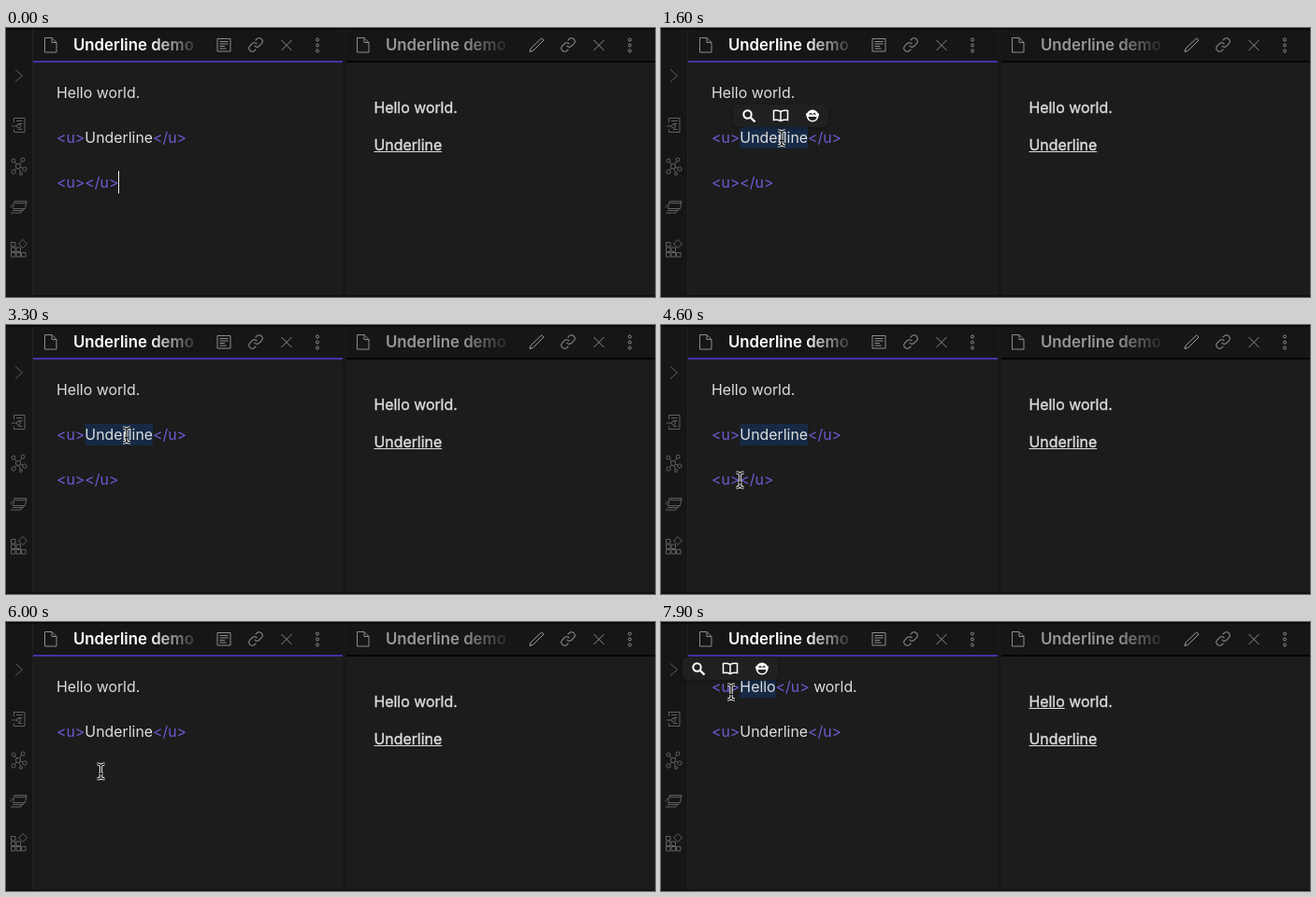
Animation of 694 by 288 pixels, one loop 8000 ms. Source, as an HTML page with a canvas:

```html
<!DOCTYPE html>
<html lang="en">
<head>
<meta charset="utf-8">
<title>Underline demo</title>
<style>
html, body { margin: 0; width: 100%; height: 100%; overflow: hidden; background: #1c1c1c; }
canvas { display: block; }
</style>
</head>
<body>
<canvas id="stage" width="694" height="288"></canvas>
<script>
const ctx = document.getElementById('stage').getContext('2d');
const LOOP = 8000, STEP = 100;
const TEXT = '#dcddde', TAG = '#6c5bd0', SELECTED = '#162a46';
const BODY_FONT = '15.87px Inter, sans-serif';
const TITLE_FONT = '600 16.8px Inter, sans-serif';
const REST = [129, 118];

// Pointer path: time, x, y
const path = [
  [500, 174, 228], [900, 88, 165], [1200, ...REST], [1900, ...REST],
  [2000, 174, 150], [2100, 76, 161], [2200, ...REST], [3700, ...REST],
  [4000, 150, 150], [4300, 91, 175], [4400, 91, 175], [4500, 84.5, 166],
  [5500, 84.5, 166], [6000, 101.5, 160], [6200, 136, 110], [6400, 108, 61],
  [6600, 75, 75], [LOOP, 75, 75]
];

const within = (t, from, to) => t >= from && t < to;
const ramp = (t, from, to) => Math.min(1, Math.max(0, (t - from) / (to - from)));

function rect(x, y, w, h, color) {
  ctx.fillStyle = color;
  ctx.fillRect(x, y, w, h);
}

function stroke(d, color, width = 1) {
  ctx.strokeStyle = color;
  ctx.lineWidth = width;
  ctx.stroke(new Path2D(d));
}

function fill(d, color) {
  ctx.fillStyle = color;
  ctx.fill(new Path2D(d));
}

const circle = (x, y, r) => `M${x - r} ${y}a${r} ${r} 0 1 0 ${2 * r} 0a${r} ${r} 0 1 0 ${-2 * r} 0z`;

function at(x, y, draw, scale = 1) {
  ctx.save();
  ctx.translate(x, y);
  ctx.scale(scale, scale);
  draw();
  ctx.restore();
}

// Draws text pieces in a row; tags are coloured, the selected piece gets a background.
function row(x, y, parts, selected) {
  ctx.font = BODY_FONT;
  for (const part of parts) {
    const w = ctx.measureText(part).width;
    if (part === selected) rect(x, y - 17, w, 23, SELECTED);
    ctx.fillStyle = part[0] === '<' ? TAG : TEXT;
    ctx.fillText(part, x, y);
    x += w;
  }
}

function preview(y, word, rest, underlined) {
  const x = 393.5;
  ctx.font = BODY_FONT;
  ctx.fillStyle = ctx.strokeStyle = TEXT;
  ctx.lineWidth = 0.35;
  ctx.fillText(word + rest, x, y);
  ctx.strokeText(word + rest, x, y);
  if (underlined) rect(x, y + 1, ctx.measureText(word).width, 1, TEXT);
}

function header(x, rgb, editing) {
  const gray = '#8c8c8c';
  stroke(`M${x + 41.5} 10.5h7.5l5 5v10.5h-12.5zM${x + 49} 10.5v5h5`, gray);

  const fade = ctx.createLinearGradient(x + 154, 0, x + 208, 0);
  fade.addColorStop(0, `rgba(${rgb},1)`);
  fade.addColorStop(1, `rgba(${rgb},0)`);
  ctx.font = TITLE_FONT;
  ctx.fillStyle = fade;
  ctx.fillText('Underline demo', x + 72, 24);

  if (editing) {
    stroke('M226 11.5h14v13.5h-14zM228.5 14.5h9M228.5 17h9M228.5 19.5h5.5M228.5 22h7', gray);
  } else {
    stroke('M560 25.5l1.2-3.6 11.5-11 2.2 2.2-11.3 11.2z', '#a0a0a0');
  }
  at(x + 258.4, 9.4, () => stroke(
    'M10 13a4.6 4.6 0 0 0 7.5.5l3-3a4.6 4.6 0 0 0-7-7l-2 2' +
    'M14 11a4.6 4.6 0 0 0-7.5-.5l-3 3a4.6 4.6 0 0 0 7 7l2-2', gray, 1.5), 0.72);
  stroke(`M${x + 294.5} 13l11 11m0-11l-11 11`, gray);
  for (const y of [12.5, 18.5, 24.5]) stroke(circle(x + 333, y, 1.5), gray);
}

function sidebar() {
  const gray = '#606060';
  stroke('M10 44.5l7.5 6.5-7.5 6.5', gray);
  stroke('M8.5 101v-4.5h11.5v15h-11.5v-3M11 99.5h6.5M13 102.5h4.5M13 108.5h4.5' +
    'M6 105h5', gray);
  stroke(circle(13.5, 105, 2), gray);
  const hub = [13, 148];
  for (const [x, y, r] of [[8, 142, 2], [18, 141, 2], [20, 151, 2.2], [8, 154, 2.2], [16, 156, 1.5]]) {
    stroke(`M${hub}L${x} ${y}`, gray);
    fill(circle(x, y, r), '#161616');
    stroke(circle(x, y, r), gray);
  }
  fill(circle(...hub, 2.6), '#161616');
  stroke(circle(...hub, 2.6), gray);
  stroke('M9 185.5h13l-1.5 8h-13zM9.5 187.5h12M7.5 189.5h-2m1.5 6h11.5l.5-2M6 191.5h-1.5M5 198h11l.5-2.5', gray);
  for (const [x, y] of [[0, 0], [0, 1], [1, 1], [0, 2], [1, 2], [2, 2]]) {
    stroke(`M${5.5 + x * 5.5} ${229.5 + y * 5.5}h4.5v4.5h-4.5z`, gray);
  }
  stroke('M18 226.5l4.5 4.5-4.5 4.5-4.5-4.5z', gray);
}

function chrome() {
  rect(0, 0, 694, 288, '#1c1c1c');
  rect(0, 0, 28, 288, '#161616');
  rect(28, 0, 666, 36, '#161616');
  rect(28, 1, 1, 286, '#222');
  rect(360, 1, 4, 286, '#181818');
  rect(0, 0, 694, 1.5, '#070707');
  rect(29, 35, 331, 2, '#4632a6');
  rect(364, 35, 330, 2, '#050505');
  rect(0, 286, 694, 2, '#121212');
  sidebar();
  header(0, '255,255,255', true);
  header(334, '150,150,150', false);
}

function popup(x, y, alpha) {
  if (!alpha) return;
  ctx.save();
  ctx.globalAlpha = alpha;
  ctx.translate(x, y);
  ctx.shadowColor = 'rgba(0,0,0,.45)';
  ctx.shadowBlur = 4;
  ctx.shadowOffsetY = 1;
  ctx.fillStyle = '#202020';
  ctx.beginPath();
  ctx.roundRect(-51, -12, 102, 24, 5);
  ctx.fill();
  ctx.shadowColor = 'transparent';

  stroke(circle(-35.5, -1.5, 4.2), '#fff', 2);
  stroke('M-32.5 1.5l5 5', '#fff', 2.4);
  stroke('M0-4.5q-3.5-2-7.5-1v10q4-1 7.5 1q3.5-2 7.5-1v-10q-4-1-7.5 1v10', '#fff', 1.5);
  fill(circle(34, 0, 6.5), '#fff');
  stroke('M27-1.5h14', '#fff', 2);
  fill('M29.5 1h9q-.5 4-4.5 4t-4.5-4z', '#202020');
  stroke('M30.5-1.5l1.5-1 1.5 1M34.5-1.5l1.5-1 1.5 1', '#202020', 1.2);
  ctx.restore();
}

function pointer(t) {
  const i = path.findIndex(p => p[0] > t);
  const [t0, x0, y0] = path[i - 1], [t1, x1, y1] = path[i];
  const k = (t - t0) / (t1 - t0);
  at(x0 + (x1 - x0) * k, y0 + (y1 - y0) * k, () => {
    const beam = 'M-4-8q4 0 4 3v10q0 3-4 3M4-8q-4 0-4 3M0 5q0 3 4 3M-2 2.5h4';
    stroke(beam, '#fff', 3.2);
    stroke(beam, '#111', 1.3);
    if (within(t, 1300, 1400) || within(t, 4700, 4800) || within(t, 6800, 7200)) {
      stroke(circle(0, 0, 17), '#fff');
      stroke(circle(0, 0, 14), '#e4e4e4');
    }
  });
}

function caret(t) {
  const spans = [[0, 500, 120], [1000, 1300, 120], [4700, 5200, 84], [5500, 6000, 54], [6500, 6800, 54]];
  const span = spans.find(([from, to]) => within(t, from, to));
  if (span) rect(span[2], 153, 1, 24, '#eee');
}

function draw(t) {
  chrome();

  const tagged = (word, on) => on ? ['<u>', word, '</u>'] : [word];
  row(54, 75, [...tagged('Hello', t >= 7600), ' world.'], t >= 7000 && 'Hello');
  row(54, 123, tagged('Underline', !within(t, 2400, 3000)), within(t, 1300, 4700) && 'Underline');
  if (t < 5500) row(54, 171, ['<u>', '</u>']);

  preview(91, 'Hello', ' world.', t >= 7900);
  preview(131, 'Underline', '', !within(t, 2700, 3300));

  caret(t);
  popup(128, 94, ramp(t, 1300, 1600) * (1 - ramp(t, 2300, 2700)));
  popup(74, 50, ramp(t, 7100, 7500));
  if (t >= 500 && !within(t, 5500, 6000)) pointer(t);
}

const start = performance.now();
function tick() {
  const t = (performance.now() - start) % LOOP;
  draw(Math.floor(t / STEP) * STEP);
  requestAnimationFrame(tick);
}
tick();
</script>
</body>
</html>
```
